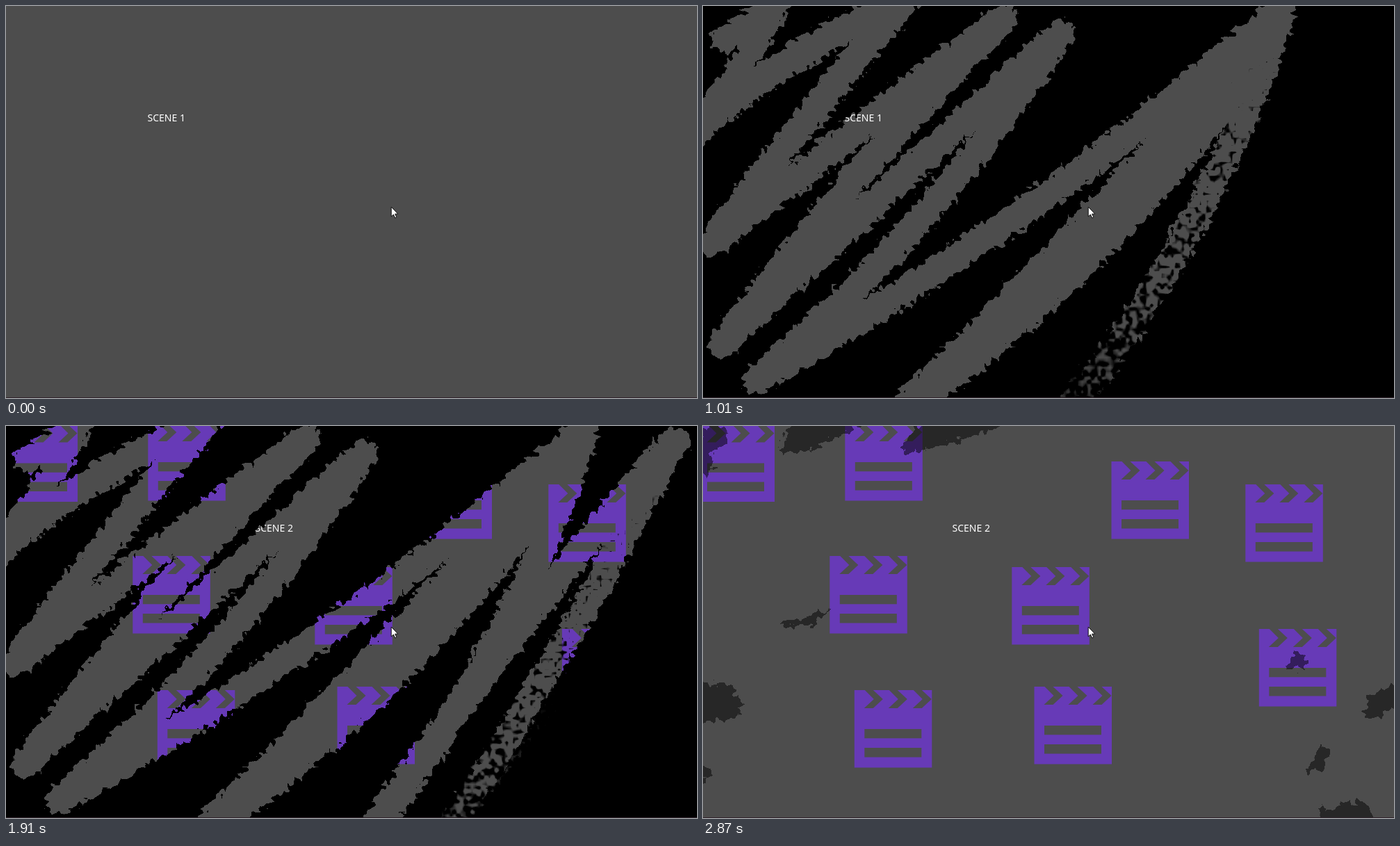
These frames come from a looping animation (994 by 564 pixels, 3810 ms). An HTML page with a canvas:

```html
<!DOCTYPE html>
<html lang="en">
<head>
<meta charset="utf-8">
<title>Scribble transition</title>
<style>
html, body { margin: 0; width: 100%; height: 100%; overflow: hidden; background: #000; }
canvas { display: block; }
</style>
</head>
<body>
<canvas id="stage" width="994" height="564"></canvas>
<script>
const W = 994, H = 564, LOOP = 3810;
const GREY = '#4d4d4d', PURPLE = '#673ab7';
const PAD = 12, BW = W + 2 * PAD, BH = H + 2 * PAD;
const clamp = (v, a, b) => Math.min(b, Math.max(a, v));

function layer() {
  const c = document.createElement('canvas');
  c.width = W;
  c.height = H;
  return c.getContext('2d');
}

// ---- scenes ----
function clapper(g, x, y) {
  g.save();
  g.translate(x, y);
  g.fillStyle = PURPLE;
  g.fillRect(0, 0, 111.5, 111.5);
  g.fillStyle = GREY;
  g.fillRect(14.5, 56, 82, 13.3);
  g.fillRect(14.5, 83, 82, 13.5);
  for (let i = 0; i < 3; i++) {
    const o = i * 35;
    g.beginPath();
    g.moveTo(o + 15, 0);
    g.lineTo(o + 27, 0);
    g.lineTo(o + 41, 13);
    g.lineTo(o + 27, 26);
    g.lineTo(o + 14, 26);
    g.lineTo(o + 28, 13);
    g.fill();
  }
  g.restore();
}

function scene(label, x, y, boards) {
  const g = layer();
  g.fillStyle = GREY;
  g.fillRect(0, 0, W, H);
  boards.forEach(b => clapper(g, b[0], b[1]));
  g.fillStyle = '#fff';
  g.font = '14px "Noto Sans", "Open Sans", sans-serif';
  g.fillText(label, x, y);
  return g.canvas;
}

const scene1 = scene('SCENE 1', 203.5, 166, []);
const scene2 = scene('SCENE 2', 358.5, 152, [
  [-8.5, -2.5], [204.3, -4], [587.5, 51], [780.3, 84], [182.3, 187],
  [444.3, 203], [799.8, 292], [217.8, 380], [476.5, 375]
]);

// ---- brush ----
function stamp(buf, x, y, r, m) {
  x += PAD;
  y += PAD;
  const y1 = Math.min(BH - 1, Math.floor(y + r));
  for (let j = Math.max(0, Math.ceil(y - r)); j <= y1; j++) {
    const w = Math.sqrt(Math.max(0, r * r - (j - y) ** 2));
    const x1 = Math.min(BW - 1, Math.floor(x + w));
    for (let i = Math.max(0, Math.ceil(x - w)); i <= x1; i++) {
      const k = j * BW + i;
      if (m < buf[k]) buf[k] = m;
    }
  }
}

// stamps along at(q) -> [x, y] while the reveal time goes from m0 to m1
function stroke(buf, at, len, r, m0, m1) {
  const steps = Math.ceil(len / 3) + 1;
  for (let s = 0; s <= steps; s++) {
    const q = s / steps, [x, y] = at(q);
    stamp(buf, x, y, r, m0 + (m1 - m0) * q);
  }
}

// line from a to b, bent sideways by bow
function line(buf, ax, ay, bx, by, bow, r, m0, m1) {
  const dx = bx - ax, dy = by - ay, len = Math.hypot(dx, dy);
  stroke(buf, q => {
    const o = 4 * bow * q * (1 - q) / len;
    return [ax + dx * q - dy * o, ay + dy * q + dx * o];
  }, len, r, m0, m1);
}

function noise(cell, seed) {
  const cols = Math.ceil(W / cell) + 2, rows = Math.ceil(H / cell) + 2;
  const grid = new Float32Array(cols * rows);
  for (let i = 0; i < grid.length; i++) {
    seed = (Math.imul(seed, 1664525) + 1013904223) >>> 0;
    grid[i] = seed / 4294967296;
  }
  return (x, y) => {
    const u = x / cell, v = y / cell, i = Math.floor(u), j = Math.floor(v);
    const a = u - i, b = v - j, k = j * cols + i;
    const top = grid[k] + (grid[k + 1] - grid[k]) * a;
    const low = grid[k + cols] + (grid[k + cols + 1] - grid[k + cols]) * a;
    return top + (low - top) * b;
  };
}

// first pass: turning point x, y and bow of the stroke that leads there
const zigzag = [
  [106, 0, 0], [-22, 190, -5], [290, -8, -16], [12, 340, 4], [430, 18, 0],
  [27, 486, 10], [513, 40, -2], [78, 536, -24], [832, 4, 24], [280, 585, -8],
  [828, 22, 41], [530, 575, -28], [962, 20, -11], [640, 575, -8], [951, 177, -3],
  [803, 575, -5], [960, 318, -3], [900, 536, 0], [975, 437, 0], [982, 575, -4]
];

// second pass: height, start x, end x, radius; the strokes level off to the left
const cross = [
  [-483, 780, 1000, 20], [-415, 720, 1000, 18], [-332, 490, 965, 21],
  [-250, 500, 930, 21], [-205, 590, 740, 14], [-275, 120, 340, 19],
  [-145, 220, 880, 18], [-75, -20, 740, 27], [20, -20, 640, 23],
  [97, -20, 590, 19], [155, 60, 420, 17], [225, -20, 360, 26], [270, 200, 330, 20]
];

function crossY(u, x) {
  const bend = 270 + Math.max(0, 20 - u), d = x - bend;
  return (u + 0.57 * (bend + (d + Math.sqrt(d * d + 900)) / 2)) / 0.82;
}

// third pass: x, y, x, y, radius
const patch = [
  [190, 543, 450, 547, 14], [570, 12, 645, 12, 15], [635, 62, 700, 62, 14],
  [850, 58, 900, 58, 16], [790, 205, 850, 205, 12], [550, 366, 870, 378, 19],
  [540, 458, 870, 440, 13], [580, 475, 850, 489, 9], [800, 514, 960, 508, 11],
  [560, 552, 840, 530, 13]
];

// parts that stay half dark at the end
const rest = [
  [125, 12, 220, 0, 25], [300, 14, 420, -20, 24], [-5, 400, 30, 396, 26],
  [88, 302, 190, 268, 9], [0, 215, 110, 178, 6], [0, 480, 4, 495, 15],
  [880, 470, 878, 480, 18], [905, 560, 945, 560, 20], [872, 140, 866, 152, 13],
  [846, 338, 858, 338, 11], [994, 386, 960, 405, 16], [0, 50, 15, 18, 20]
];

function buildMap() {
  const raw = new Float32Array(BW * BH).fill(9);
  const late = new Float32Array(BW * BH).fill(9);
  let x = 28, y = 48, m = 0;
  zigzag.forEach(([ex, ey, bow], i) => {
    const end = m + 0.0000415 * Math.hypot(ex - x, ey - y);
    const r = i < 2 ? 18 : i < 12 ? 20.5 : 20.5 - (i - 12) * 1.2;
    line(raw, x, y, ex, ey, bow, r, m, end);
    x = ex;
    y = ey;
    m = end;
  });
  const part = 0.215 / cross.length;
  cross.forEach(([u, x0, x1, r], i) => stroke(raw, q => {
    const cx = x0 + (x1 - x0) * q;
    return [cx, crossY(u, cx)];
  }, 1.2 * (x1 - x0), r, 0.495 + part * i, 0.495 + part * (i + 1)));
  patch.forEach(([ax, ay, bx, by, r], i) =>
    line(raw, ax, ay, bx, by, 0, r, 0.705 + 0.013 * i, 0.718 + 0.013 * i));
  rest.forEach(([ax, ay, bx, by, r]) => line(late, ax, ay, bx, by, 0, r, 1, 1));

  const nx = noise(5, 11), ny = noise(5, 77), grit = noise(5, 301);
  const map = new Float32Array(W * H);
  for (let j = 0; j < H; j++) {
    for (let i = 0; i < W; i++) {
      const dx = Math.round((nx(i, j) - 0.5) * 13), dy = Math.round((ny(i, j) - 0.5) * 13);
      const k = (j + PAD + dy) * BW + i + PAD + dx;
      let v = raw[k];
      if (v > 2) v = late[k] < 2 ? 9 : 0.87 + 0.09 * Math.hypot(i - W / 2, j - H / 2) / 572;
      map[j * W + i] = v > 2 ? v : v + 0.03 * grit(i, j) ** 2;
    }
  }
  return map;
}

// ---- playback ----
const map = buildMap();
const mask = layer(), mix = layer();
const bits = mask.createImageData(W, H);
const ctx = document.getElementById('stage').getContext('2d');
const arrow = new Path2D('M554.2 289v14l3.2-3 2.4 5 2.1-1-2.3-4.8h4.2z');

function reveal(picture, p) {
  const px = bits.data;
  for (let i = 0; i < map.length; i++) {
    const m = map[i];
    px[4 * i + 3] = m > 2 ? (p > 0.99 ? 128 : 0) : 255 * clamp((p - m) / 0.01, 0, 1);
  }
  mask.putImageData(bits, 0, 0);
  mix.globalCompositeOperation = 'copy';
  mix.drawImage(picture, 0, 0);
  mix.globalCompositeOperation = 'destination-in';
  mix.drawImage(mask.canvas, 0, 0);
  ctx.drawImage(mix.canvas, 0, 0);
}

function stepAt(t, start, end, count) {
  return clamp(Math.floor((t - start) / (end - start) * count + 1e-4), 0, count);
}

let shown = '';
function draw(t) {
  let picture = scene1, p = 2;
  if (t >= 1420) {
    picture = scene2;
    p = 0.018 + 0.982 * stepAt(t, 1420, 2870, 21) / 21;
  } else if (t >= 260) {
    p = 1 - stepAt(t, 260, 1220, 14) / 14;
  }
  const key = (picture === scene1) + ':' + p;
  if (key === shown) return;
  shown = key;

  ctx.fillStyle = '#000';
  ctx.fillRect(0, 0, W, H);
  if (p > 1.5) ctx.drawImage(picture, 0, 0);
  else if (p > 0) reveal(picture, p);
  ctx.fillStyle = '#30222b';
  ctx.fillRect(0, 563, W, 1);
  ctx.fillStyle = '#fff';
  ctx.strokeStyle = '#111';
  ctx.lineWidth = 1;
  ctx.fill(arrow);
  ctx.stroke(arrow);
}

const began = performance.now();
function tick() {
  draw((performance.now() - began) % LOOP);
  requestAnimationFrame(tick);
}
tick();
</script>
</body>
</html>
```
